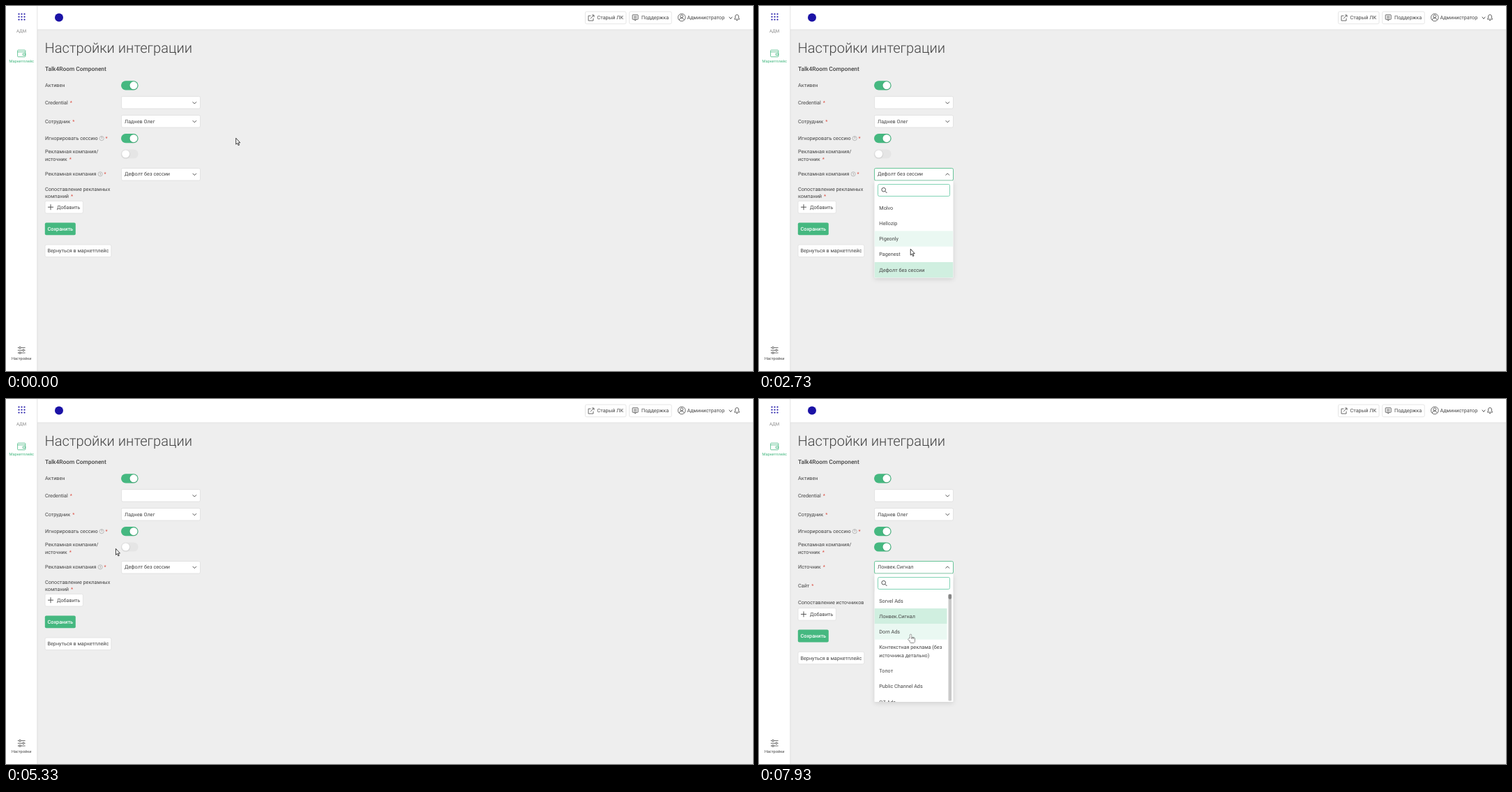
An HTML page with a canvas that plays this animation: 1071x523 px, repeating every 8000 ms.

```html
<!DOCTYPE html>
<html lang="ru">
<head>
<meta charset="utf-8">
<title>Настройки интеграции</title>
<style>
html, body { margin: 0; width: 100%; height: 100%; overflow: hidden; background: #eee; }
canvas { display: block; width: 1071px; height: 523px; }
</style>
</head>
<body>
<canvas id="stage"></canvas>
<script>
const W = 1071, H = 523, LOOP = 8000, STEP = 200 / 3;
const canvas = document.getElementById('stage');
const ctx = canvas.getContext('2d');
const dpr = window.devicePixelRatio || 1;
canvas.width = W * dpr;
canvas.height = H * dpr;

const INK = '#444', GREEN = '#45b880', LINE = '#dedede', RED = '#dc4a3d', NAVY = '#1b12a6';
const BODY = 7.25, ROW = 22.3, LEADING = 11.2;
const LEFT = 56, FIELD = 165.5, FIELD_W = 113;

// Event times, ms
const OPEN_A = 2130, CLOSE_A = 4260, FLIP = 5650, SWAP = 5860, LOADED = 6470, OPEN_B = 7260;

// Pointer moves: start, end, x, y, arc height
const HOME = { x: 329.5, y: 189 };
const MOVES = [
  [20, 530, 190, 196, 18], [605, 930, 130, 212], [1010, 1330, 169, 213, 3],
  [1540, 2000, 230, 241], [2130, 3000, 213.5, 377], [3000, 3480, 209, 283],
  [3507, 3800, 212, 383], [3940, 4260, 391, 263], [4670, 5130, 110, 222],
  [5130, 5470, 182.5, 210], [6000, 6400, 399, 186, 18], [6400, 6700, 306, 205],
  [6700, 7130, 222, 243], [7530, 7930, 217.5, 337.5]
];

const LIST_A = ['Molvo', 'Hellozip', 'Pigeonly', 'Pagenest', 'Дефолт без сессии'];
const LIST_B = ['Sorvel Ads', 'Лонвек.Сигнал', 'Dorn Ads', 'Контекстная реклама (без|источника детально)',
  'Топот', 'Public Channel Ads', 'QZ Ads'];

const clamp = v => Math.max(0, Math.min(1, v));
const ease = u => (1 - Math.cos(Math.PI * u)) / 2;

function pointer(t) {
  let { x, y } = HOME;
  for (const [start, end, toX, toY, arc = 0] of MOVES) {
    if (t < start) break;
    const k = ease(clamp((t - start) / (end - start)));
    x += (toX - x) * k;
    y += (toY - y) * k - arc * 4 * k * (1 - k);
  }
  return { x, y };
}

function text(s, x, y, o = {}) {
  const size = o.size || BODY;
  ctx.font = `${o.weight || 400} ${size}px Roboto, sans-serif`;
  ctx.fillStyle = o.color || INK;
  ctx.textAlign = o.align || 'left';
  ctx.fillText(s, x, y + size * 0.355);
  return ctx.measureText(s).width;
}

function box(x, y, w, h, fill, stroke, r = 2) {
  ctx.beginPath();
  ctx.roundRect(x, y, w, h, r);
  if (fill) { ctx.fillStyle = fill; ctx.fill(); }
  if (stroke) { ctx.strokeStyle = stroke; ctx.lineWidth = 0.8; ctx.stroke(); }
}

function line(color, width, ...points) {
  ctx.strokeStyle = color;
  ctx.lineWidth = width;
  ctx.beginPath();
  for (let i = 0; i < points.length; i += 2) ctx.lineTo(points[i], points[i + 1]);
  ctx.stroke();
}

function ring(x, y, r, color, width = 0.8, from = 0, to = 2 * Math.PI) {
  ctx.beginPath();
  ctx.arc(x, y, r, from, to);
  ctx.strokeStyle = color;
  ctx.lineWidth = width;
  ctx.stroke();
}

function disc(x, y, r, color) {
  ctx.beginPath();
  ctx.arc(x, y, r, 0, 2 * Math.PI);
  ctx.fillStyle = color;
  ctx.fill();
}

function shadow(color = 'transparent', blur = 0, dy = 0) {
  ctx.shadowColor = color;
  ctx.shadowBlur = blur * dpr;
  ctx.shadowOffsetY = dy * dpr;
}

function at(x, y, paint) {
  ctx.save();
  ctx.translate(x, y);
  paint();
  ctx.restore();
}

function chevron(x, y, up, w = 2.7) {
  const d = up ? -1.4 : 1.4;
  line(INK, 0.9, x - w, y - d, x, y + d, x + w, y - d);
}

function label(s, y, mark = '') {
  let x = LEFT + text(s, LEFT, y);
  if (mark.includes('?')) {
    ring(x + 5.6, y, 3.1, '#999', 0.6);
    text('?', x + 5.6, y, { size: 5, color: '#888', align: 'center' });
    x += 8;
  }
  if (mark.includes('*')) text('*', x + 3, y, { color: RED });
}

function toggle(y, on = 1, busy = false) {
  const track = color => box(165, y - 6.6, 24.6, 13.2, color, null, 6.6);
  ctx.globalAlpha = busy ? 0.5 : 1;
  track('#e5e5e5');
  ctx.globalAlpha *= on;
  track(GREEN);
  ctx.globalAlpha = 1;
  shadow('rgba(0,0,0,.2)', 2, 0.5);
  disc(171.6 + 11.4 * on, y, 5.5, busy ? '#f4faf7' : '#fff');
  shadow();
}

function select(y, value, o = {}) {
  box(FIELD, Math.floor(y - 8.6) + 0.5, FIELD_W, 17.5, o.busy ? '#f9fafa' : '#fff', o.border || LINE);
  if (value) text(value, 170, y - 0.2);
  chevron(270.3, y + 0.2, o.up);
}

function button(s, x, y, w, textX) {
  box(x, y - 8.8, w, 17.6, '#fff', '#e0e0e0');
  text(s, textX, y);
}

function spinner(y, t) {
  const a = (t - 6000) / 1000 * 2 * Math.PI;
  ring(222, y, 6.9, '#c3e5d6');
  ring(222, y, 6.9, '#5fbd94', 0.9, a, a + Math.PI);
}

function sidebar() {
  for (let i = 0; i < 9; i++) disc(18.5 + i % 3 * 4, 11.5 + Math.floor(i / 3) * 4, 1.1, NAVY);
  text('АДМ', 22, 36, { size: 6.2, color: '#888', align: 'center' });

  at(22.2, 68, () => {
    box(-5.6, -4.8, 11.2, 9.6, null, GREEN, 1);
    line(GREEN, 0.8, -5.6, -2.2, 5.6, -2.2);
    box(2, 0, 3.6, 2.6, null, GREEN, 0);
  });
  text('Маркетплейс', 22.2, 79.4, { size: 5.6, color: GREEN, align: 'center' });

  for (let i = -1; i <= 1; i++) {
    const y = 493.3 + i * 3.7, x = i ? 20 : 25;
    line(INK, 0.8, 16.8, y, 27.6, y);
    disc(x, y, 1.5, '#fff');
    ring(x, y, 1.3, INK);
  }
  text('Настройки', 22.2, 505.3, { size: 5.6, align: 'center' });
}

function header() {
  disc(76, 16.5, 6, NAVY);

  button('Старый ЛК', 830.5, 16.8, 58.5, 847.5);
  at(839, 17, () => {
    line(INK, 0.8, -0.5, -3, -4, -3, -4, 4, 3, 4, 3, 0.5);
    line(INK, 0.8, -1, 1, 4, -4);
    line(INK, 0.8, 1, -4, 4, -4, 4, -1);
  });

  button('Поддержка', 893.7, 16.8, 60.5, 911);
  at(902.2, 16.2, () => {
    box(-4, -3.5, 8, 6.5, null, INK, 0.5);
    line(INK, 0.8, -1.5, 3, 0, 4.8, 1.5, 3);
    for (const y of [-1.2, 0.8]) line(INK, 0.8, -2.2, y, 2.2, y);
  });

  at(968.8, 16.4, () => {
    ring(0, 0, 5.3, INK);
    ring(0, -1.6, 2, INK);
    ring(0, 4.6, 3.7, INK, 0.8, Math.PI * 1.1, Math.PI * 1.9);
  });
  text('Администратор', 976.5, 16.8);
  chevron(1039, 17, false, 2.2);

  at(1048, 15, () => {
    ring(0, 0, 2.5, INK, 0.8, Math.PI, 0);
    line(INK, 0.8, -2.5, 0, -2.5, 2, -3.6, 4, 3.6, 4, 2.5, 2, 2.5, 0);
    line(INK, 0.8, -1, 5.5, 1, 5.5);
  });
}

function shell() {
  ctx.fillStyle = '#eee';
  ctx.fillRect(0, 0, W, H);
  shadow('rgba(0,0,0,.08)', 2, 0.5);
  ctx.fillStyle = '#fff';
  ctx.fillRect(44.6, 0, W, 33.5);
  ctx.fillRect(0, 0, 44.6, H);
  shadow();
  line('#e7e7e7', 0.8, 44.6, 0, 44.6, H);
  sidebar();
  header();
}

function form(t) {
  const swapped = t >= SWAP, busy = swapped && t < LOADED;

  text('Настройки интеграции', 55.6, 60, { size: 20.1, weight: 300 });
  text('Talk4Room Component', LEFT, 90.1, { size: 8.37, weight: 500 });
  label('Активен', 113.7);
  toggle(113.8);
  label('Credential', 138.3, '*');
  select(138.5);
  label('Сотрудник', 165.1, '*');
  select(165.3, 'Ладнев Олег');
  label('Игнорировать сессию', 189.7, '?*');
  toggle(189.7);
  label('Рекламная компания/', 208.6);
  label('источник', 208.6 + LEADING - 0.3, '*');
  toggle(212, clamp((t - FLIP + 40) / 110), t >= FLIP && t < LOADED);

  if (swapped) {
    const focus = t >= OPEN_B - 130;
    label('Источник', 240.8, '*');
    select(241, busy ? '' : LIST_B[1], { busy, up: t >= OPEN_B, border: focus && GREEN });
    label('Сайт', 267.6, '*');
    select(268, '', { busy });
    if (busy) [241, 268].forEach(y => spinner(y, t));
    label('Сопоставление источников', 291.2);
  } else {
    const open = t >= OPEN_A && t < CLOSE_A, hover = t >= 1980 && t < OPEN_A;
    label('Рекламная компания', 240.8, '?*');
    select(241, LIST_A[4], { up: open, border: open ? GREEN : hover && '#6fcaa4' });
    label('Сопоставление рекламных', 262);
    label('компаний', 262 + LEADING - 0.3, '*');
  }

  at(0, swapped ? 20.2 : 0, () => {
    button('Добавить', LEFT, 288.2, 54.4, 73);
    line(INK, 0.9, 60, 288.2, 68, 288.2);
    line(INK, 0.9, 64, 284.2, 64, 292.2);
    box(55.8, 310.4, 44, 17.8, GREEN);
    text('Сохранить', 77.8, 319.5, { color: '#fff', weight: 500, align: 'center' });
    button('Вернуться в маркетплейс', LEFT, 350.8, 94.8, 59.5);
  });
}

function panel(t, opened, closed, items, bottom, chosen, scroll) {
  const k = clamp((t - opened + 40) / 240) * (1 - clamp((t - closed) / 200));
  if (!k) return;
  const top = 250.5, listTop = 277.8, hoverY = pointer(t - STEP).y;
  const rowW = scroll ? 104 : FIELD_W;
  ctx.save();
  ctx.globalAlpha = k;
  ctx.translate(0, top);
  ctx.scale(1, 0.75 + 0.25 * k);
  ctx.translate(0, -top);
  shadow('rgba(0,0,0,.13)', 7, 2);
  box(FIELD, top, FIELD_W, bottom - top, '#fff', null, 1);
  shadow();

  box(170.5, 255.5, 103, 17, '#fff', '#62c8a2');
  ring(178.7, 263.2, 2.8, INK, 0.9);
  line(INK, 1, 180.8, 265.3, 183.4, 268);
  if ((t - opened) % 1000 < 500) line('#333', 0.8, 187.7, 260, 187.7, 268.3);

  ctx.beginPath();
  ctx.rect(FIELD, listTop, FIELD_W, bottom - listTop);
  ctx.clip();
  let y = listTop;
  items.forEach((item, i) => {
    const rows = item.split('|'), h = ROW + (rows.length - 1) * LEADING;
    const hover = hoverY >= y && hoverY < y + h;
    if (i === chosen || hover) {
      ctx.fillStyle = i === chosen ? '#d0efe0' : '#eaf8f2';
      ctx.fillRect(FIELD, y, rowW, h);
    }
    rows.forEach((s, n) => text(s, 172.3, y + LEADING + n * LEADING));
    y += h;
  });
  if (scroll) {
    box(271.5, 279.5, 4.6, 153, '#c9c9c9', null, 1);
    box(271.5, 279.8, 4.6, 7, '#858585', null, 2);
  }
  ctx.restore();
}

function arrow() {
  const p = new Path2D('M.2.3V9.2L2.2 7.4L3.6 10.7L5 10.1L3.6 6.9H6.2Z');
  ctx.fillStyle = '#fff';
  ctx.fill(p);
  ctx.strokeStyle = '#111';
  ctx.lineWidth = 0.8;
  ctx.stroke(p);
}

function hand() {
  const parts = (fill, stroke) => {
    box(-3.4, 5.5, 5, 3, fill, stroke, 1.4);
    box(-1.1, 4.2, 6.8, 7.6, fill, stroke, 1.8);
    box(-1.1, -0.2, 2.2, 8, fill, stroke, 1.1);
  };
  parts(null, '#111');
  parts('#fff');
  for (const x of [1.1, 2.7, 4.3]) line('#111', 0.5, x, 4.4, x, 6.4);
}

function beam() {
  line('#222', 0.8, 0, -4.5, 0, 4.5);
  for (const y of [-4.5, 4.5]) line('#222', 0.8, -2, y, 2, y);
}

function cursor(t) {
  const { x, y } = pointer(t);
  const near = (row, reach) => x > FIELD && Math.abs(y - row) < reach;
  const onToggle = near(212, 6.5) && x < 190;
  const onSelect = near(241, 9) && x < FIELD + FIELD_W && (t < CLOSE_A || t > LOADED);
  const onList = t > OPEN_B && y > 277;
  at(x, y, onToggle || onList ? hand : onSelect ? beam : arrow);
}

function draw(now) {
  // The picture advances 15 times a second
  const t = Math.floor((now % LOOP + 5) / STEP) * STEP % LOOP;
  ctx.setTransform(dpr, 0, 0, dpr, 0, 0);
  ctx.textRendering = 'geometricPrecision';
  shell();
  form(t);
  panel(t, OPEN_A, CLOSE_A, LIST_A, 389.5, 4, false);
  panel(t, OPEN_B, LOOP, LIST_B, 434, 1, true);
  cursor(t);
}

const start = performance.now();
function tick() {
  draw(performance.now() - start);
  requestAnimationFrame(tick);
}
tick();
</script>
</body>
</html>
```
